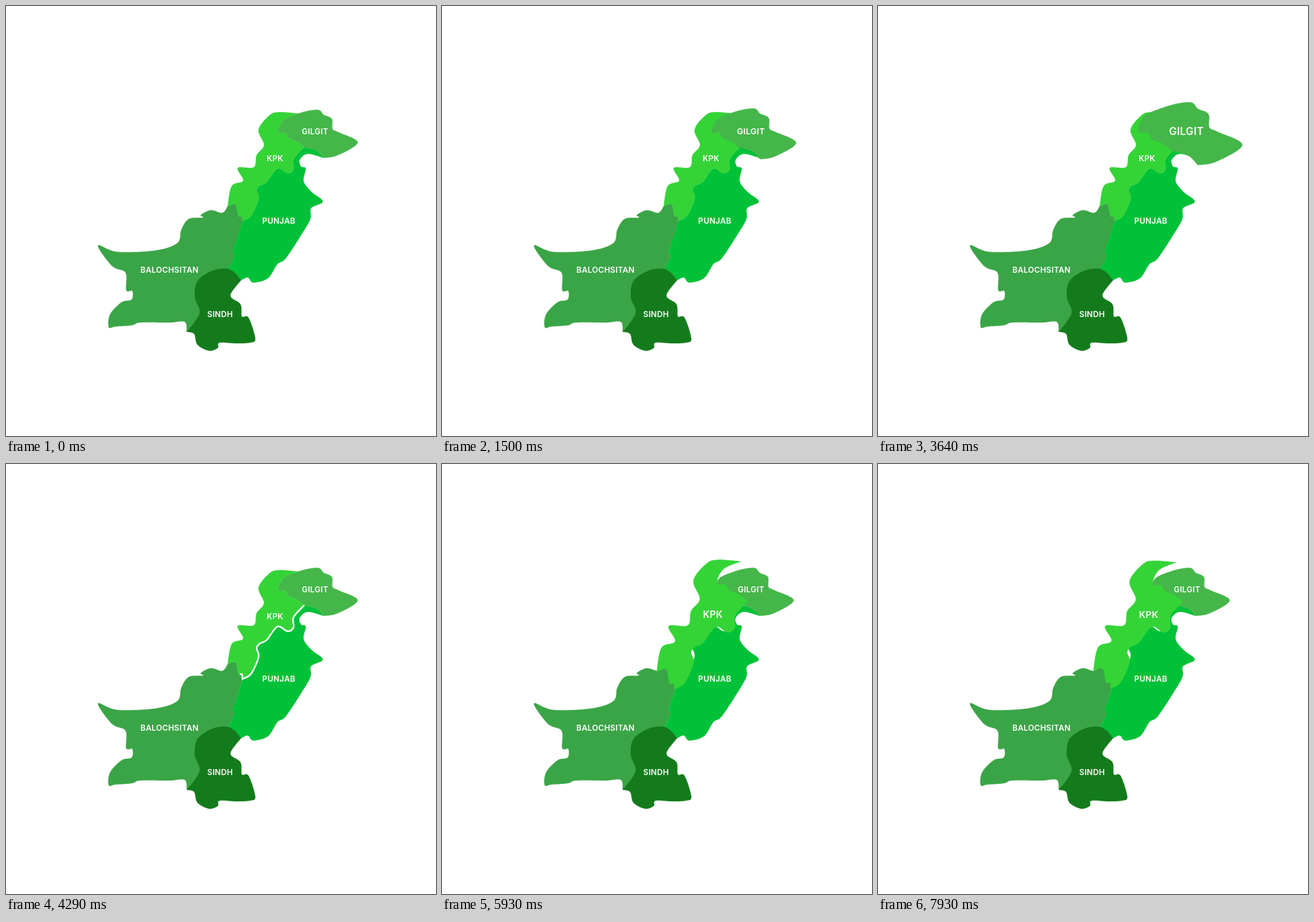
Write an HTML page that moves like this. It is 640 px wide and 640 px high and loops after 8000 ms.

```html
<!DOCTYPE html>
<html lang="en">
<head>
<meta charset="utf-8">
<title>Provinces</title>
<style>
  html, body { margin: 0; height: 100%; overflow: hidden; background: #fff; }
  svg { display: block; width: 100%; height: 100%; }
  text { font: 600 11.7px Inter, sans-serif; fill: #fff; text-anchor: middle; letter-spacing: .25px; }
  .land { stroke-width: .3; }
  .trace { fill: none; stroke: #fff; stroke-width: 2.4; }
</style>
</head>
<body>
<svg id="map" viewBox="0 0 640 640"></svg>
<script>
const LOOP = 8000, TURN = 4070, GROWTH = 0.32;

// Key points of each border, shared by the provinces on both sides
const borders = {
  kpkGilgit: '435,160 413,170 405,188 416,189 421,197 432,201 444,210',
  kpkPunjab: '444,210 428,228 428,243 419,249 404,242 388,262 378,267 373,274 376,287 365,312 352,320',
  kpkBaloch: '352,320 351,313 346,312 342,295 330,298',
  kpkOuter: '330,298 336,268 353,260 345,241 369,240 373,222 384,207 376,184 392,163 406,158 435,160',
  gilgitPunjab: '444,210 462,215 473,226',
  gilgitOuter: '473,226 494,222 523.5,203 495,188 486,183 485,168 473,162 466,155 450,156 435,160',
  punjabOuter: '473,226 449,220 437,229 439,239 446,242 443,261 455,277 471.5,291 454,301 453,317 438,343 416,376 404,384 390,405 368,411.5 360,404 350,408',
  balochPunjab: '352,320 346,340 338,364 340,373 331,391',
  sindhPunjab: '331,391 341,397 350,408',
  sindhBaloch: '331,391 309,393 285,409 281,434 288,457 269,485',
  sindhOuter: '350,408 334,431 349,444 351,462 361,464 371,495 363,501 344,502 318,501 315,509 302,513 285,504 280,488 269,485',
  balochOuter: '269,485 266,470 243,471 200,471 188,475 163,477 153,478 155,459 172,441 187,437 188,424 179,423 178,397 158,387 137,356.5 165,366 222,364 255,353 261,333 272,317 293,315 290,311 305,304 322,308 330,298'
};

// A leading "-" walks the border backwards
function points(name) {
  const reversed = name[0] === '-';
  const list = borders[reversed ? name.slice(1) : name].split(' ').map(p => p.split(',').map(Number));
  return reversed ? list.reverse() : list;
}

// Catmull-Rom spline as cubic segments
function spline(p) {
  let d = '';
  for (let i = 0; i < p.length - 1; i++) {
    const a = p[i - 1] || p[i], b = p[i], c = p[i + 1], e = p[i + 2] || c;
    const c1 = b.map((v, k) => v + (c[k] - a[k]) / 6);
    const c2 = c.map((v, k) => v - (e[k] - b[k]) / 6);
    d += `C${c1} ${c2} ${c}`;
  }
  return d;
}

function outline(names) {
  const arcs = names.split(' ').map(points);
  return `M${arcs[0][0]}${arcs.map(spline).join('')}Z`;
}

const map = document.getElementById('map');

function make(tag, attrs, parent) {
  const node = document.createElementNS('http://www.w3.org/2000/svg', tag);
  for (const key in attrs) node.setAttribute(key, attrs[key]);
  return parent.appendChild(node);
}

function province(label, x, y, color, names) {
  const d = outline(names), group = make('g', {}, map);
  make('path', { class: 'land', d, fill: color, stroke: color }, group);
  make('text', { x, y }, group).textContent = label;
  return { group, d };
}

// A province that is traced in white, then grows about (cx, cy) and shrinks back
function turn({ group, d }, start, cx, cy) {
  const trace = make('path', { class: 'trace', d, pathLength: 1 }, group);
  return { group, trace, start, cx, cy };
}

province('BALOCHSITAN', 243.3, 396.5, '#3aa546', 'balochPunjab sindhBaloch balochOuter -kpkBaloch');
province('PUNJAB', 406, 323.5, '#00c138', 'kpkPunjab balochPunjab sindhPunjab -punjabOuter -gilgitPunjab');
province('SINDH', 318.6, 462.7, '#147b1c', 'sindhPunjab sindhOuter -sindhBaloch');
const kpk = province('KPK', 400.3, 230.5, '#34d437', 'kpkPunjab kpkBaloch kpkOuter kpkGilgit');
const gilgit = province('GILGIT', 460, 191.4, '#45b649', 'gilgitPunjab gilgitOuter kpkGilgit');

const turns = [turn(gilgit, 0, 463, 191), turn(kpk, TURN, 385, 239)];

// Sine ease from 0 to 1 between two times
function ease(t, from, to) {
  const u = Math.min(1, Math.max(0, (t - from) / (to - from)));
  return (1 - Math.cos(Math.PI * u)) / 2;
}

function pose({ group, trace, start, cx, cy }, time) {
  const t = time - start;
  const scale = 1 + GROWTH * (ease(t, 1140, 2430) - ease(t, 3570, 4180));
  group.setAttribute('transform', `translate(${cx} ${cy}) scale(${scale}) translate(${-cx} ${-cy})`);

  const head = ease(t, 0, 560), tail = ease(t, 570, 1140);
  trace.style.display = head > tail ? '' : 'none';
  trace.setAttribute('stroke-dasharray', `0 ${tail} ${head - tail} 2`);
}

function draw(now) {
  const time = now % LOOP;
  const top = turns[time < TURN ? 0 : 1].group;
  if (map.lastChild !== top) map.append(top);
  turns.forEach(item => pose(item, time));
  requestAnimationFrame(draw);
}

draw(0);
</script>
</body>
</html>
```
